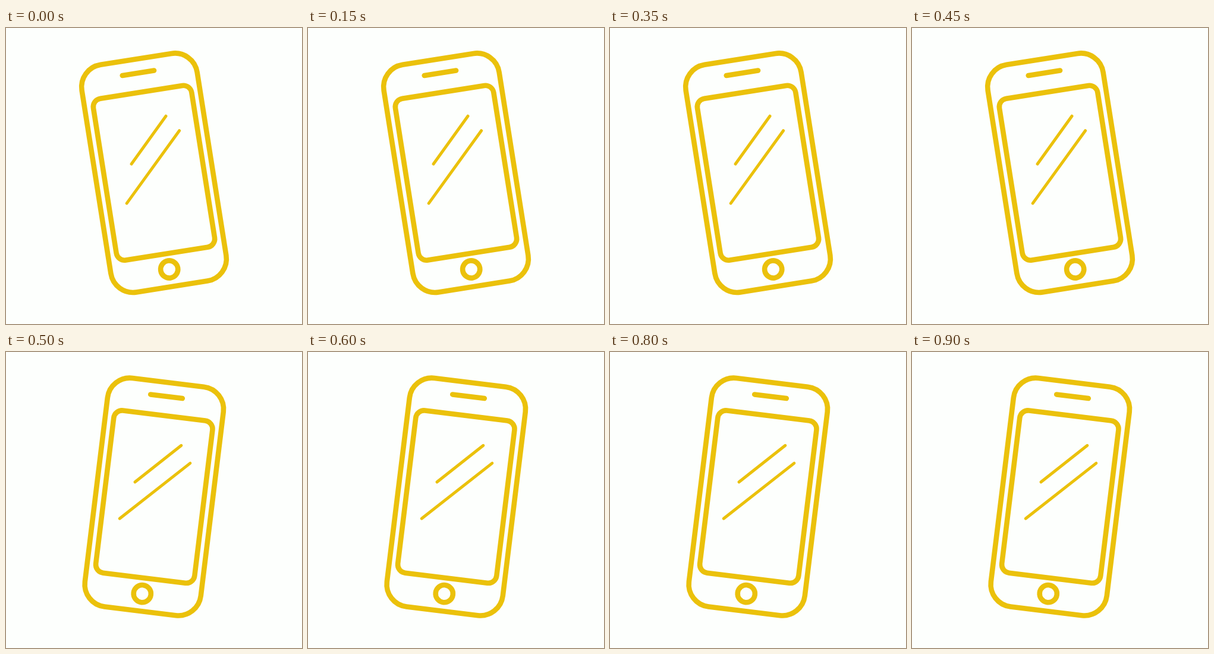
Recreate the animation shown at these times as an HTML page. Size 498 by 498 pixels, loop 0.95 s.

```html
<!DOCTYPE html>
<html lang="en">
<head>
<meta charset="utf-8">
<title>Ringing phone</title>
<style>
  html, body { margin: 0; width: 100%; height: 100%; overflow: hidden; background: #fdfffd; }
  svg { display: block; width: 100vw; height: 100vh; }
  #phone { fill: none; stroke: #ebc10b; stroke-width: 8.6; stroke-linecap: round; }
  .shine { stroke-width: 5; }
</style>
</head>
<body>
<svg viewBox="0 0 498 498">
  <g id="phone" transform="translate(249 243.7) rotate(-9)">
    <rect x="-98.2" y="-193.7" width="196.4" height="387.4" rx="37.8"/>
    <rect x="-83.7" y="-137.6" width="167.4" height="275.2" rx="14"/>
    <path d="M-27-170.1H27"/>
    <circle cy="164.3" r="14.6"/>
    <path class="shine" d="M34.7-91.2L-35.1-20.7M53.2-63.4L-53.2 43.4"/>
  </g>
</svg>
<script>
  const LOOP = 950;
  // Each pose holds until the next one starts.
  const poses = [
    { at: 0, x: 249, y: 243.7, tilt: -9 },
    { at: 500, x: 249.3, y: 243.6, tilt: 7 },
  ];
  const phone = document.getElementById('phone');
  const start = performance.now();

  function draw(now) {
    const t = Math.max(0, now - start) % LOOP;
    const { x, y, tilt } = poses.findLast(p => p.at <= t);
    phone.setAttribute('transform', `translate(${x} ${y}) rotate(${tilt})`);
    requestAnimationFrame(draw);
  }
  draw(start);
</script>
</body>
</html>
```
